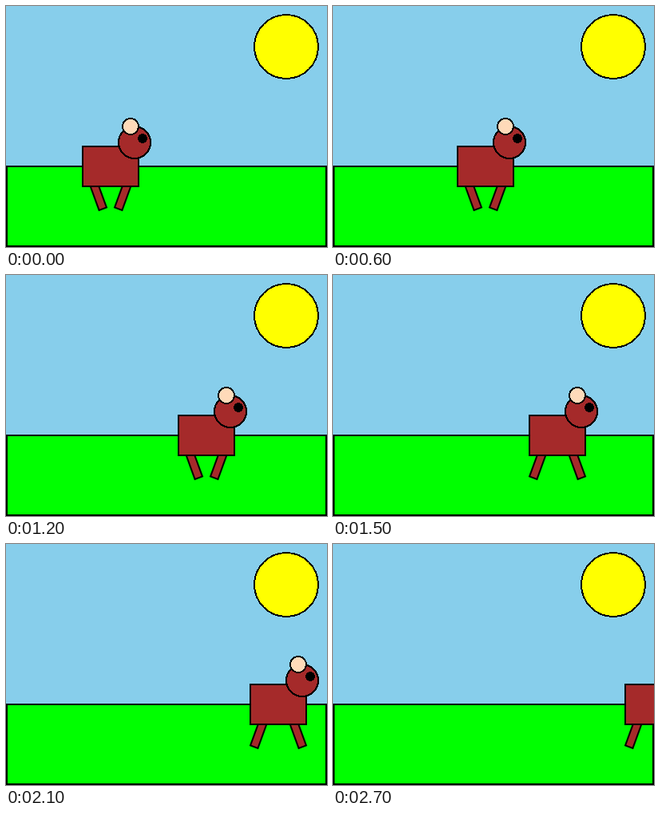
Animation of 402x302 px, one loop 3100 ms. Source, as an HTML page:

```html
<!DOCTYPE html>
<html lang="en">
<head>
<meta charset="utf-8">
<title>Walking in the meadow</title>
<style>
  html, body { margin: 0; width: 100%; height: 100%; overflow: hidden; background: #87ceeb; }
  svg { display: block; width: 402px; height: 302px; shape-rendering: crispEdges; stroke: #000; stroke-width: 2; }
  .coat { fill: #a52a2a; }
</style>
</head>
<body>
<svg viewBox="0 0 402 302">
  <rect x="1" y="201" width="400" height="100" fill="#0f0"/>
  <circle cx="351" cy="51" r="40" fill="#ff0"/>
  <g id="animal">
    <rect id="back" class="coat" x="-5" y="-8" width="10" height="38"/>
    <rect id="front" class="coat" x="-5" y="-8" width="10" height="38"/>
    <rect class="coat" x="96" y="176" width="70" height="50"/>
    <circle class="coat" cx="161" cy="171" r="20"/>
    <circle cx="171" cy="166" r="5"/>
    <circle cx="156" cy="151" r="10" fill="#ffdab9"/>
  </g>
</svg>
<script>
  const LOOP = 3100, STEP = 300, COUNT = 10, STRIDE = 30, SWING = 20;

  // Holds each pose for one step; the last one stays until the loop ends.
  function play(id, pose) {
    const frames = [];
    for (let i = 0; i < COUNT; i++) {
      frames.push({ offset: i * STEP / LOOP, transform: pose(i), easing: 'steps(1, end)' });
    }
    frames.push({ offset: 1, transform: pose(COUNT - 1) });
    const anim = document.getElementById(id).animate(frames, { duration: LOOP, iterations: Infinity });
    anim.startTime = 0;
    return anim;
  }

  const leg = (x, side) => i =>
    `translate(${x}px, 226px) rotate(${(i % 2 ? 1 : -1) * side * SWING}deg)`;

  const anims = [
    play('animal', i => `translate(${i * STRIDE}px, 0px)`),
    play('back', leg(111, 1)),
    play('front', leg(151, -1))
  ];
  const start = document.timeline.currentTime || 0;
  anims.forEach(a => { a.startTime = start; });
</script>
</body>
</html>
```
